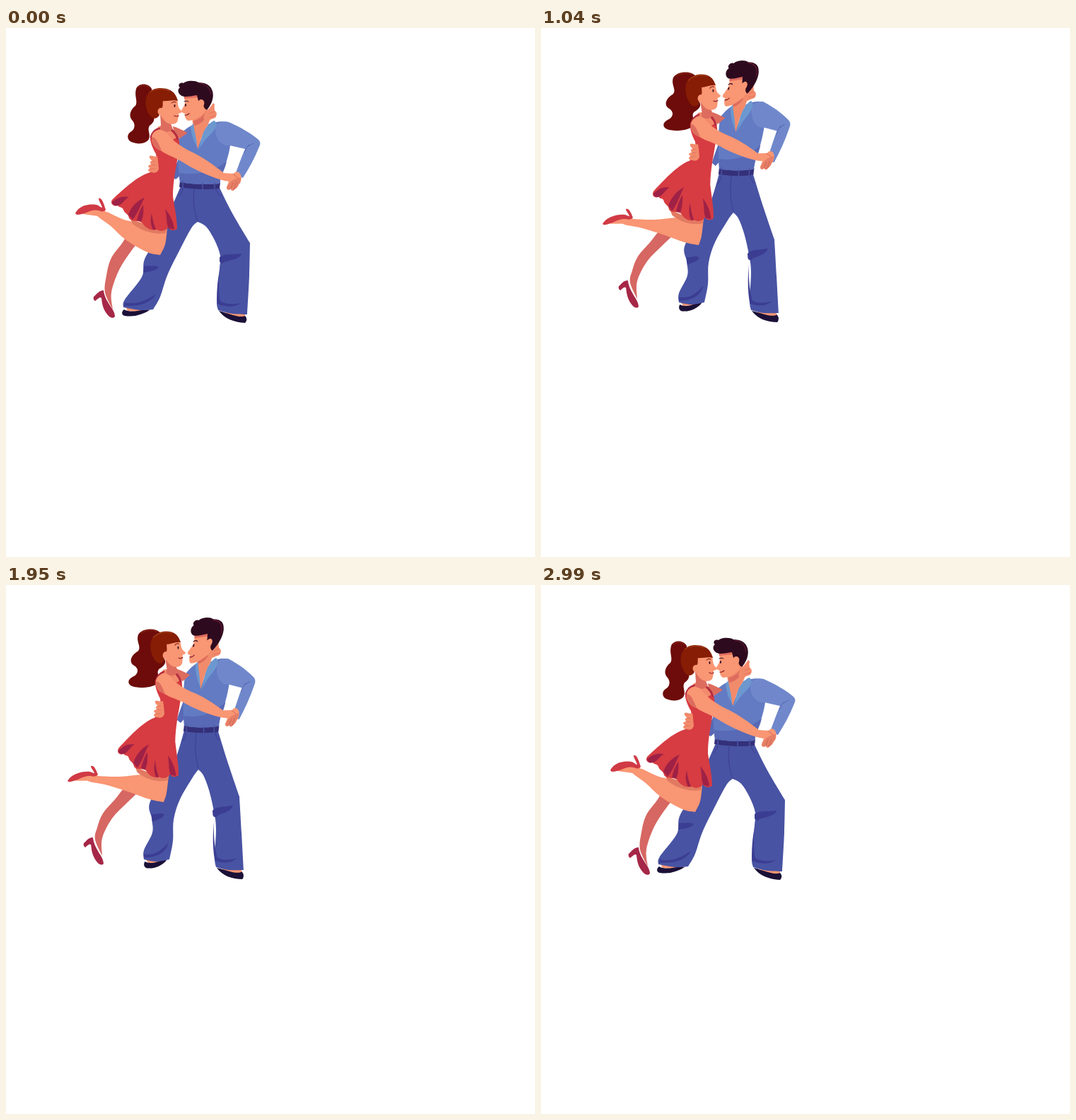
Recreate the animation shown at these times as an HTML page. Size 748 px wide and 748 px high, loop 3120 ms.

```html
<!DOCTYPE html>
<html lang="en">
<head>
<meta charset="utf-8">
<title>Dancing couple</title>
<style>
  html, body { margin: 0; width: 100%; height: 100%; overflow: hidden; background: #fff; }
  svg { display: block; width: 100vw; height: 100vh; }
</style>
</head>
<body>
<svg id="stage" viewBox="0 0 748 748"></svg>
<script>
const stage = document.getElementById('stage');
const STEP = 130;

const SKIN = '#f99673', SKIN_MID = '#f28b6b', SKIN_DARK = '#dd6c5e';
const HAIR_F = '#861d04', TAIL = '#6d0c0a', HAIR_M = '#2e0a1f';
const RED = '#d63c42', WINE = '#9f2146', LEG = '#d66762';
const SHIRT = '#627bc3', SLEEVE = '#7088cb', SHADE = '#5869b5', COLLAR = '#6c98cf';
const JEAN = '#4853a3', JEAN_DARK = '#3b3d93', BELT = '#343079', SHOE = '#1b1037';

// Four key poses (low, rising, high, back); the cubic through them fills the gaps.
const WEIGHTS = [
  [1, 0, 0, 0], [0, 1, 0, 0], [-.2, .75, .5, -.05],
  [0, 0, 1, 0], [.2, -.5, 1, .3], [0, 0, 0, 1]
];

const updates = [];
const points = text => text.trim().split(/\s+/).map(p => p.split(',').map(Number));
const blend = (poses, w) => poses[0].map((_, i) =>
  [0, 1].map(k => poses.reduce((sum, pose, j) => sum + pose[i][k] * w[j], 0)));

function add(tag, attrs, parent = stage) {
  const el = document.createElementNS('http://www.w3.org/2000/svg', tag);
  for (const key in attrs) el.setAttribute(key, attrs[key]);
  parent.appendChild(el);
  return el;
}

// Matrix taking one anchor triangle to another; a single anchor only shifts.
function mapping(from, to) {
  const [p, q] = [from[0], to[0]];
  if (from.length < 3) return [1, 0, 0, 1, q[0] - p[0], q[1] - p[1]];
  const edge = (t, i) => [t[i][0] - t[0][0], t[i][1] - t[0][1]];
  const [u, v, s, t] = [edge(from, 1), edge(from, 2), edge(to, 1), edge(to, 2)];
  const det = u[0] * v[1] - u[1] * v[0];
  const [a, b] = [0, 1].map(k => (s[k] * v[1] - t[k] * u[1]) / det);
  const [c, d] = [0, 1].map(k => (t[k] * u[0] - s[k] * v[0]) / det);
  return [a, b, c, d, q[0] - a * p[0] - c * p[1], q[1] - b * p[0] - d * p[1]];
}

// Shapes are [fill, path] or [stroke, path, width].
function part(anchors, ...shapes) {
  const poses = anchors.map(points);
  const g = add('g');
  for (const [color, d, width] of shapes) {
    add('path', width
      ? { d, fill: 'none', stroke: color, 'stroke-width': width, 'stroke-linecap': 'round' }
      : { d, fill: color }, g);
  }
  updates.push(w => g.setAttribute('transform', `matrix(${mapping(poses[0], blend(poses, w))})`));
}

// Closed smooth outline, sharp at the listed corners.
function outline(pts, corners) {
  const n = pts.length, at = i => pts[(i + n) % n];
  const sharp = i => corners.includes(i % n);
  let d = 'M' + pts[0];
  for (let i = 0; i < n; i++) {
    const p = at(i), q = at(i + 1);
    const before = sharp(i) ? p : at(i - 1), after = sharp(i + 1) ? q : at(i + 2);
    const c1 = p.map((x, k) => x + (q[k] - before[k]) / 6);
    const c2 = q.map((x, k) => x - (after[k] - p[k]) / 6);
    d += `C${c1} ${c2} ${q}`;
  }
  return d + 'Z';
}

function morph(fill, corners, ...texts) {
  const poses = texts.map(points);
  const el = add('path', { fill });
  updates.push(w => el.setAttribute('d', outline(blend(poses, w), corners)));
}

const dot = (x, y, rx, ry = rx) =>
  `M${x - rx},${y}a${rx},${ry} 0 1 0 ${2 * rx},0a${rx},${ry} 0 1 0 ${-2 * rx},0Z`;

const TORSO = ['246,217 298,133 360,161', '254,205 300,114 357,145', '252,198 300,105 353,134', '242,222 297,136 355,168'];
const DRESS = ['203,155 150,246 242,286', '208,145 162,240 248,277', '210,137 159,234 244,271', '206,161 132,246 228,283'];
const SHIN_L = ['195,338 166,395 208,398', '206,330 186,391 222,392', '206,326 195,388 231,388', '191,336 187,397 217,398'];
const SHIN_R = ['303,325 300,399 341,405', '299,322 300,400 337,404', '293,320 297,399 336,403', '303,325 297,402 335,406'];

// Her back leg and shoe
morph(LEG, [0, 5, 9],
  '174,272 168,298 149,325 142,350 140,374 151,398 149,374 160,342 178,314 192,298',
  '181,266 167,300 146,325 140,348 137,368 147,391 145,366 158,336 178,312 197,296',
  '172,280 155,302 137,323 129,343 126,360 136,383 136,358 150,330 170,309 190,290',
  '153,275 143,302 120,332 112,355 110,378 121,400 118,376 134,338 155,315 177,298');
part(['124,382 137,371 153,410', '121,376 133,366 148,404', '110,367 122,357 137,396', '94,382 107,373 122,411'],
  ['#a62747', 'M124,380C128,377 131,371 138,371C139,380 143,386 148,394C151,398 154,403 154,408C152,411 147,410 144,406C138,399 136,392 135,382C133,379 130,383 126,386C124,385 123,382 124,380Z']);

// His shoes
part(SHIN_L,
  [SKIN, 'M168,393L206,396L198,402L172,400Z'],
  [SHOE, 'M167,398C163,401 163,406 168,407C182,409 193,405 203,399C198,397 192,399 186,400C179,401 172,401 167,398Z']);
part(SHIN_R,
  [SKIN, 'M304,398L338,403L338,410L318,408Z'],
  [SHOE, 'M301,400C309,411 322,416 338,417C341,414 341,410 338,407C334,409 328,408 321,406C313,404 307,401 301,400Z']);

// His trousers
morph(JEAN, [0, 1, 2, 7, 9],
  '247,224 302,226 271,274 262,283 245,315 228,350 218,380 208,398 190,399 166,395 168,384 192,352 195,330 205,310 230,262',
  '254,212 303,213 276,266 268,277 250,308 238,338 233,368 222,392 203,394 186,391 188,378 204,350 207,330 207,310 238,262',
  '252,206 300,207 272,261 264,272 246,303 237,332 236,362 231,388 212,391 195,388 195,375 207,350 206,330 204,306 235,258',
  '242,226 299,230 264,275 250,283 232,303 221,335 223,375 217,398 202,401 187,397 189,382 193,352 187,330 186,312 215,266');
morph(JEAN, [0, 1, 3, 5, 7, 13],
  '247,224 302,226 320,262 345,304 344,350 341,405 320,404 300,399 298,385 302,340 303,322 295,300 283,281 271,274',
  '254,212 303,213 318,255 337,302 338,350 337,404 318,403 300,400 298,385 300,345 298,322 291,295 283,274 276,266',
  '252,206 300,207 315,255 330,299 333,350 336,403 315,403 297,399 295,385 297,345 294,320 287,290 279,269 272,261',
  '242,226 299,230 320,265 343,307 340,350 335,406 318,405 297,402 296,393 302,350 303,325 293,300 275,280 264,275');
part(SHIN_L,
  [JEAN_DARK, 'M195,336C202,338 209,334 216,338C213,343 204,344 194,346Z'],
  [JEAN_DARK, 'M168,388C182,392 198,386 212,376C206,388 190,394 167,393Z']);
part(SHIN_R,
  [JEAN_DARK, 'M302,324C309,318 321,321 333,319C332,326 318,328 309,331C306,334 303,333 302,330Z'],
  [JEAN_DARK, 'M304,334C300,350 300,372 303,386C310,391 322,391 332,389C322,396 308,394 299,390C297,370 300,350 304,334Z']);

// His shirt and belt
part(TORSO,
  [JEAN_DARK, 'M266,228C264,245 266,260 271,273', 1],
  [JEAN_DARK, 'M250,227C249,232 247,235 244,238M296,227C298,232 300,235 303,238', 1],
  [SHADE, 'M246,180C242,190 238,198 234,210L240,214L247,208Z'],
  [BELT, 'M246,216C264,220 284,220 303,218L302,227C284,229 264,228 245,225Z'],
  [SHIRT, 'M246,218C243,200 242,170 245,152C250,145 258,140 264,137L271,168L286,136C292,133 305,131 315,133L317,166C315,180 311,192 304,210L302,220C284,222 264,221 246,218Z'],
  [SHADE, 'M245,205C268,209 292,204 312,189C310,198 306,205 304,210L302,220C284,222 264,221 246,218Z'],
  [SLEEVE, 'M296,140C300,132 308,132 315,133C331,140 345,148 357,158C360,161 360,164 358,168C352,183 344,198 335,212C331,210 327,209 324,207C329,194 333,182 338,171L316,166C306,167 295,158 296,140Z'],
  [SHADE, 'M337,176L341,168L350,163M341,168L344,165', 1],
  [JEAN, 'M250,217V226M278,220V228M295,219V228', 1.6],
  [SKIN_MID, 'M264,135C266,148 268,160 271,171C275,160 277,150 285,138L290,126L284,115L263,126Z'],
  [SKIN_DARK, 'M265,131C272,130 278,125 282,119L285,123C280,132 273,137 266,138Z'],
  [COLLAR, 'M261,140L265,135C266,146 270,156 270,168C264,158 262,148 261,140Z'],
  [COLLAR, 'M271,173C276,165 275,154 281,144C285,138 290,132 295,131L298,136C295,147 287,152 282,158Z']);

// Her hand behind his neck
part(['290,118', '295,99', '296,90', '298,121'],
  [SKIN_MID, 'M282,118C288,114 290,110 293,106L295,108C294,112 295,115 295,117C299,119 298,123 297,125C296,128 292,128 290,129C286,132 281,131 279,127Z'],
  [SKIN_DARK, 'M288,121L295,118M288,126L296,124', .8]);

// His head
part(['244,83 248,117 293,92', '258,64 255,102 303,74', '264,56 257,95 308,65', '261,83 256,121 306,94'],
  [SKIN, 'M252,95L253,106C252,111 249,114 248,117C248,120 251,120 253,121C252,125 254,129 257,131C264,131 271,128 279,121L286,112L281,97Z'],
  [SKIN_DARK, 'M251,95L272,94L271,98L252,100Z'],
  [HAIR_M, 'M284,116C279,113 279,110 280,106C280,101 274,102 272,103L270,95C262,96 252,99 247,95C242,91 243,86 246,84C242,81 246,76 251,78C255,74 268,74 272,77C282,77 289,81 291,87C295,95 292,107 284,116Z'],
  [SKIN, dot(276, 106, 4.4, 5)],
  ['#6b2036', 'M273,78C283,79 289,85 290,94', 1],
  [HAIR_M, dot(254, 109, 1, 1.9)],
  [HAIR_M, 'M252,104Q255,102 258,104', 1],
  ['#7d1c2b', 'M253,123Q256,124 259,121', 1.1]);

// Her front leg and shoe
morph(SKIN, [0, 3, 5],
  '143,260 170,272 200,276 228,284 225,306 218,321 200,317 170,300 148,280 128,264',
  '137,270 168,275 200,274 233,276 232,298 225,313 205,309 172,297 145,284 122,276',
  '129,270 160,271 195,268 230,269 227,294 223,307 203,303 172,292 143,283 116,277',
  '114,266 140,273 175,276 208,280 207,304 203,318 187,315 150,302 125,285 103,270');
part(['98,262 132,241 140,258', '96,276 129,255 137,268', '87,277 121,256 129,269', '75,270 107,250 114,264'],
  [SKIN, 'M108,263C116,257 128,255 138,256L142,261L130,266Z'],
  ['#d03a45', 'M98,262C103,252 115,248 128,250C132,251 134,254 136,254C135,249 131,245 131,241C135,239 138,247 141,257C139,260 135,260 131,258C120,255 113,264 100,264Z']);

// Her ponytail
part(['194,79 175,124 185,164', '200,71 174,116 190,153', '201,62 176,108 192,146', '201,86 174,132 193,169'],
  [TAIL, 'M206,86C202,78 188,77 184,86C181,96 187,104 183,110C176,115 173,124 178,130C184,136 182,144 176,147C170,151 171,160 180,162C188,165 199,163 202,157C205,150 199,144 203,138C209,134 212,128 207,121C200,112 204,104 206,98Z'],
  ['#8c2a14', 'M187,84C191,80 198,80 203,84', 1]);

// Her dress
part(DRESS,
  ['#e27a62', 'M176,270C190,274 200,282 213,283L228,282L226,290C208,293 190,286 179,277Z'],
  [SKIN_DARK, 'M236,139C244,141 250,145 257,148L246,156L238,152Z'],
  [SKIN_MID, 'M216,139L231,138L244,155L228,164L205,152Z'],
  [RED, 'M204,152C203,158 206,168 212,178C214,188 210,198 204,204C188,208 168,226 150,243C147,248 151,253 158,251C161,255 164,252 166,257C168,263 173,262 174,269C178,275 186,271 192,275C198,284 206,287 213,285C220,289 226,286 229,282C232,287 238,287 242,284C242,270 238,252 236,238C236,218 240,200 243,182C246,168 246,160 243,154L232,160C225,160 219,152 213,150Z'],
  ['#b42d40', 'M225,139C233,142 240,148 243,157', 3],
  ['#b42d40', 'M205,154C207,147 212,143 217,142', 2.4],
  [WINE, 'M150,246C157,240 165,237 174,239C168,242 164,250 158,251C154,252 150,250 150,246Z'],
  [WINE, 'M173,264C177,253 185,244 196,240C191,248 188,260 179,271Z'],
  [WINE, 'M185,272C187,263 190,256 194,250C195,260 194,268 191,274Z'],
  [WINE, 'M225,256C228,267 226,276 230,283L238,285C237,274 232,264 225,256Z'],
  [WINE, 'M206,262C204,270 204,278 208,285L212,285C209,278 207,270 206,262Z']);

// His hand on her waist
part(['208,192', '217,182', '216,175', '204,196'],
  [SKIN_MID, 'M214,181C210,183 205,179 203,181C202,184 205,186 207,188C203,188 203,191 206,193C200,193 200,197 204,198C199,200 201,204 206,204C212,206 215,203 216,199L215,188Z'],
  [SKIN_DARK, 'M206,188L211,189M205,193L211,194M204,199L210,199', .8]);

// Her head
part(['198,106 242,102 241,135', '203,96 245,89 246,122', '205,90 246,80 248,114', '204,111 246,104 248,139'],
  [SKIN_DARK, 'M218,122L219,137C215,144 223,149 231,146L236,143L232,133Z'],
  [SKIN, 'M221,101L242,100C243,106 243,111 245,114L249,118C249,120 246,120 244,121C244,125 244,127 243,129C243,133 240,136 235,136C228,136 223,131 219,124Z'],
  [HAIR_F, 'M243,103C236,101 228,104 222,103C221,108 223,112 219,114C214,114 215,120 217,123C212,131 206,128 202,122C196,112 196,98 202,91C209,84 222,84 230,87C238,90 241,96 243,103Z'],
  [SKIN, dot(219, 118, 4.5, 5)],
  ['#a9481f', 'M203,91C211,85 223,85 231,89', 1],
  [HAIR_M, dot(238.5, 110, 1, 2)],
  [TAIL, 'M234,106Q237,103 240,105', 1],
  ['#8a1f2a', 'M238,124Q241,126 244,124', 1.2]);

// Her front arm and the joined hands
part(['206,152 333,210 313,228', '210,142 332,188 314,208', '212,134 330,180 311,199', '208,158 330,215 310,233'],
  [SKIN, 'M206,154C207,145 218,141 226,147C234,158 246,167 260,174C278,182 294,194 308,205L322,206C324,203 328,202 331,206C334,211 333,218 329,221C328,225 325,227 322,229C320,231 318,229 318,227C316,230 312,229 312,225L315,217L309,216C292,212 268,201 252,191C240,183 228,180 220,174C211,171 205,163 206,154Z'],
  [SKIN_DARK, 'M206,155C209,152 215,160 220,174C211,171 206,163 206,155Z'],
  ['#e67f67', 'M312,226C316,217 321,213 332,211C332,217 331,220 329,221C328,225 325,227 322,229C320,231 318,229 318,227C316,230 312,229 312,226Z'],
  ['#c95b52', 'M318,227L321,219M322,229L326,218M321,206L328,212', .8]);

let shown = -1;
function draw(now) {
  const slot = Math.floor(now / STEP) % 12;
  const pose = Math.min(slot, 11 - slot);
  if (pose !== shown) {
    shown = pose;
    updates.forEach(update => update(WEIGHTS[pose]));
  }
}

function tick() {
  draw(performance.now());
  requestAnimationFrame(tick);
}
tick();
</script>
</body>
</html>
```
